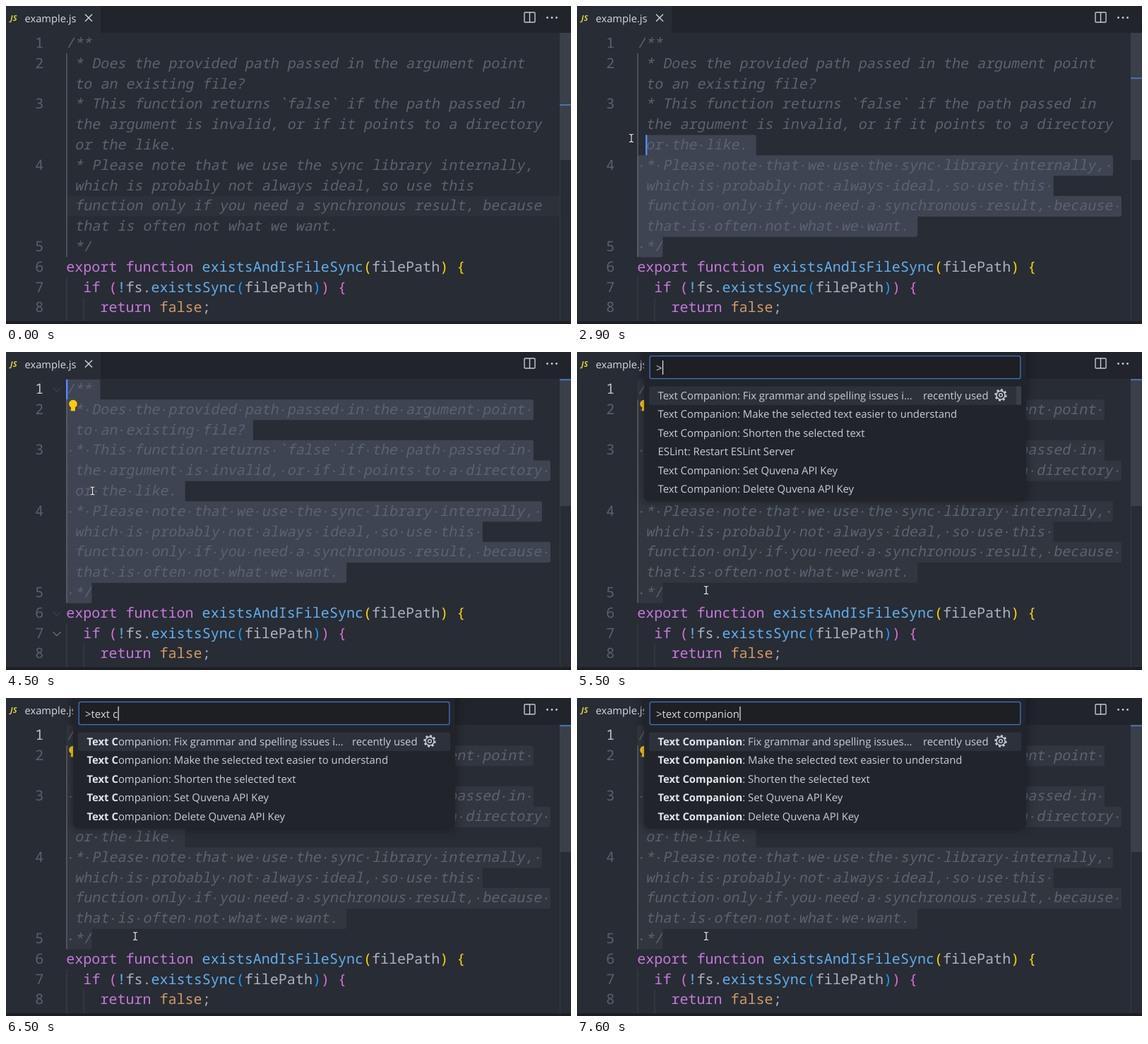
Recreate the animation shown at these times as an HTML page. Size 800 by 450 pixels, loop 8 s.

```html
<!DOCTYPE html>
<html lang="en">
<head>
<meta charset="utf-8">
<title>Editor command palette</title>
<style>
html, body { margin: 0; width: 100%; height: 100%; overflow: hidden; background: #282c34; }
svg { display: block; width: 800px; height: 450px; }
text { white-space: pre; text-rendering: geometricPrecision; }
.code { font: 20.05px "Noto Sans Mono", "DejaVu Sans Mono", monospace; }
.ui { font: 14.85px "Open Sans", "Noto Sans", sans-serif; fill: #c9cdd5; }
.hit { font-weight: 700; fill: #e1e4e9; }
</style>
</head>
<body>
<svg id="stage" viewBox="0 0 800 450" xmlns="http://www.w3.org/2000/svg"></svg>
<script>
const LOOP = 8000, STEP = 100;
const X0 = 85.3, CW = 12.03, TOP = 38.4, ROW = 28.8, LAST = 10, LAST_COL = 3;
const CLICK = 2500, RELEASE = 3800, BULB = 4200, OPEN = 5400, TYPE = 5800, KEY = 130;
const QUERY = "text companion";

const GREY = "#abb2bf", PURPLE = "#c678dd", BLUE = "#61afef",
      GOLD = "#ffd700", PINK = "#da70d6", AZURE = "#179fff";

// Comment rows: line number (0 when wrapped), first column, text
const comment = [
  [1, 0, "/**"],
  [2, 0, " * Does the provided path passed in the argument point"],
  [0, 1, "to an existing file?"],
  [3, 0, " * This function returns `false` if the path passed in"],
  [0, 1, "the argument is invalid, or if it points to a directory"],
  [0, 1, "or the like."],
  [4, 0, " * Please note that we use the sync library internally,"],
  [0, 1, "which is probably not always ideal, so use this"],
  [0, 1, "function only if you need a synchronous result, because"],
  [0, 1, "that is often not what we want."],
  [5, 0, " */"]
];
const code = [
  [6, 0, [["export function ", PURPLE], ["existsAndIsFileSync", BLUE], ["(", GOLD],
          ["filePath", GREY], [") {", GOLD]]],
  [7, 2, [["if ", PURPLE], ["(", PINK], ["!", BLUE], ["fs.", GREY], ["existsSync", BLUE],
          ["(", AZURE], ["filePath", GREY], [")", AZURE], [") {", PINK]]],
  [8, 4, [["return ", PURPLE], ["false", "#d19a66"], [";", GREY]]]
];
const commands = [
  ["Text Companion: Fix grammar and spelling issues i…", "Text Companion: Fix grammar and spelling issues…"],
  ["Text Companion: Make the selected text easier to understand"],
  ["Text Companion: Shorten the selected text"],
  ["ESLint: Restart ESLint Server"],
  ["Text Companion: Set Quvena API Key"],
  ["Text Companion: Delete Quvena API Key"]
];
// Pointer path: time, x, y
const path = [
  [1800, 92, 363], [2200, 119, 342], [2500, 124, 341], [2900, 77, 187],
  [3300, 58, 85], [3600, 62, 56], [4200, 62, 56], [4800, 183, 337]
];
const fades = [[1799, 0], [1800, 1], [2300, 0], [RELEASE, 0], [4200, 1], [4700, 0]];

const stage = document.getElementById("stage");
function el(tag, attrs, parent = stage, text) {
  const n = document.createElementNS("http://www.w3.org/2000/svg", tag);
  for (const k in attrs) n.setAttribute(k, attrs[k]);
  if (text !== undefined) n.textContent = text;
  parent.appendChild(n);
  return n;
}
const set = (n, attrs) => { for (const k in attrs) n.setAttribute(k, attrs[k]); };
const show = (n, on) => n.setAttribute("visibility", on ? "visible" : "hidden");
const box = (x, y, w, h, fill, parent, rx = 0) =>
  el("rect", { x, y, width: w, height: h, fill, rx }, parent);
const line = (d, stroke, width, parent) =>
  el("path", { d, stroke, "stroke-width": width, fill: "none" }, parent);
const colX = c => X0 + c * CW;
const rowY = r => TOP + r * ROW;
const clamp = (v, a, b) => Math.max(a, Math.min(b, v));
const colEnd = r => comment[r][1] + comment[r][2].length;

function track(keys, t) {
  if (t <= keys[0][0]) return keys[0].slice(1);
  for (let i = 1; i < keys.length; i++) {
    const a = keys[i - 1], b = keys[i];
    if (t <= b[0]) {
      const p = (t - a[0]) / (b[0] - a[0]);
      return a.slice(1).map((v, j) => v + (b[j + 1] - v) * p);
    }
  }
  return keys[keys.length - 1].slice(1);
}

// Editor
box(0, 0, 800, 450, "#282c34");
const rowLight = box(X0, rowY(8), 784 - X0, ROW, "#2c313a");
const selection = el("g", {});
const dots = el("g", { fill: "#5c6371" });
line(`M86 ${rowY(1)}V${rowY(11)}`, "#666b75", 1.2);
line(`M86 ${rowY(12)}V446M110 ${rowY(13)}V446`, "#3b4048", 1.2);

const numbers = [];
function lineNumber(n, row) {
  if (n) numbers[row] = el("text", { x: 41.2, y: rowY(row) + 20.6, class: "code" }, stage, n);
}
comment.forEach(([n, col, text], r) => {
  lineNumber(n, r);
  el("text", { class: "code", fill: "#5c6370",
    transform: `translate(${colX(col)} ${rowY(r) + 20.6}) skewX(-11)` }, stage, text);
});
code.forEach(([n, col, parts], i) => {
  const row = LAST + 1 + i;
  lineNumber(n, row);
  const t = el("text", { x: colX(col), y: rowY(row) + 20.6, class: "code" });
  for (const [s, fill] of parts) el("tspan", { fill }, t, s);
});
const chevrons = [[0, .28], [11, .28], [12, 1]].map(([r, max]) => {
  const y = rowY(r) + 12;
  return [line(`M66.5 ${y}l5.5 5.5l5.5 -5.5`, "#c5c8ce", 1.4), max];
});
const caret = box(0, 0, 2.4, ROW, "#528bff");

const bulb = el("g", {});
el("circle", { cx: 95, cy: 73.5, r: 5.8, fill: "#ffcc00" }, bulb);
box(92, 78, 6, 5.5, "#ffcc00", bulb, 1);

// Scroll bar
line("M784.5 38V446", "#343942", 1);
box(784, 38, 16, 180, "#3b3f49");
const marker = box(784, 0, 16, 2, "#4a72b5");

// Tab bar
box(0, 0, 800, 38, "#21252b");
box(0, 0, 134, 38.5, "#282c34");
el("text", { x: 6, y: 21, fill: "#d6cf3c",
  style: "font:italic 700 11px 'Open Sans','Noto Sans',sans-serif" }, stage, "JS");
el("text", { x: 26.5, y: 23, class: "ui", style: "font-size:14.7px;fill:#d7dae0" }, stage, "example.js");
line("M112 11.8l10 10m0 -10l-10 10", "#d0d3d9", 1.4);
el("rect", { x: 734, y: 9, width: 15, height: 14, rx: 1, fill: "none", stroke: "#c5c8ce", "stroke-width": 1.4 });
line("M741.5 9V23", "#c5c8ce", 1.4);
for (const cx of [766.5, 773, 779.5]) el("circle", { cx, cy: 16.5, r: 1.4, fill: "#c5c8ce" });
box(0, 446, 800, 4, "#1c1f24");

// Command palette
const palette = el("g", {});
const panel = box(95, -12, 541, 100, "#21252b", palette, 7);
panel.style.filter = "drop-shadow(0 0 7px rgba(0,0,0,.42))";
el("rect", { x: 103.2, y: 5.7, width: 524.6, height: 32, rx: 2.5, fill: "#1d1f23",
  stroke: "#4272c4", "stroke-width": 1.3 }, palette);
const input = el("text", { x: 112, y: 28, class: "ui", style: "font-size:15px;fill:#d7dae0" }, palette);
const inputCaret = box(0, 12, 1.3, 20, "#d7dae0", palette);
box(102, 48.5, 527, 26.5, "#2c313a", palette, 3);
const listBar = box(622, 48.5, 7, 26, "#3a3f4a", palette);
const items = commands.map(() => el("text", { x: 114.5, class: "ui" }, palette));
el("text", { x: 490, y: 67, class: "ui" }, palette, "recently used");
const gear = el("g", { fill: "none", stroke: "#d0d3d9" }, palette);
el("circle", { cx: 600, cy: 61, r: 6, "stroke-width": 1.4 }, gear);
el("circle", { cx: 600, cy: 61, r: 7.6, "stroke-width": 2.2, pathLength: 16, "stroke-dasharray": "1 1" }, gear);
el("circle", { cx: 600, cy: 61, r: 2.4, "stroke-width": 1.3 }, gear);

// Pointer
const pointer = el("g", {});
const beam = "M-3 -5.5Q0 -5.5 0 -4Q0 -5.5 3 -5.5M0 -4V4M-3 5.5Q0 5.5 0 4Q0 5.5 3 5.5";
line(beam, "#15171b", 2.6, pointer).setAttribute("opacity", .5);
line(beam, "#f0f0f0", 1.2, pointer);

function drawSelection(row, col, fill) {
  selection.replaceChildren();
  dots.replaceChildren();
  if (row === LAST && col === LAST_COL) return;
  const left = r => colX(r === row ? col : 0);
  const right = r => colX(r === LAST ? LAST_COL : colEnd(r) + 1);
  for (let r = row; r <= LAST; r++) {
    const [, start, text] = comment[r];
    const x = left(r), y = rowY(r);
    box(x, y, right(r) - x, ROW + .3, fill, selection, 3);
    if (r < LAST) {
      const sx = Math.max(x, left(r + 1));
      box(sx, y + ROW - 4, Math.max(0, Math.min(right(r), right(r + 1)) - sx), 8, fill, selection);
    }
    const wrapped = r < LAST && !comment[r + 1][0];
    [...text + (wrapped ? " " : "")].forEach((ch, i) => {
      const c = start + i;
      if (ch === " " && (r > row || c >= col))
        el("circle", { cx: colX(c + .5), cy: y + 15, r: 1.3 }, dots);
    });
  }
}

function drawItem(node, label, hit, i) {
  node.replaceChildren();
  node.setAttribute("y", 67 + 26.45 * i);
  const at = hit ? label.toLowerCase().indexOf(hit) : 0;
  el("tspan", {}, node, label.slice(0, at));
  el("tspan", { class: "hit" }, node, label.slice(at, at + hit.length));
  el("tspan", {}, node, label.slice(at + hit.length));
}

function drawPalette(t) {
  const count = t < TYPE ? 0 : clamp(Math.floor((t - TYPE) / KEY) + 1, 0, QUERY.length);
  const typed = QUERY.slice(0, count), hit = typed.trim();
  input.textContent = ">" + typed;
  inputCaret.setAttribute("x", 112.3 + input.getComputedTextLength());
  show(listBar, t >= OPEN && t < OPEN + 200);
  let shown = 0;
  commands.forEach((labels, i) => {
    const label = count > 9 && labels[1] || labels[0];
    const match = label.toLowerCase().includes(hit);
    items[i].style.display = match ? "" : "none";
    if (match) drawItem(items[i], label, typed, shown++);
  });
  panel.setAttribute("height", 64.5 + 26.45 * shown);
}

function draw(t) {
  const [mx, my] = track(path, t);
  show(pointer, t >= path[0][0]);
  pointer.setAttribute("transform", `translate(${mx} ${my})`);

  // The caret follows the pointer while dragging
  const active = t >= CLICK, open = t >= OPEN;
  let row = 8, col = 1;
  if (active) {
    const [dx, dy] = track(path, Math.min(t, RELEASE));
    row = clamp(Math.floor((dy - TOP) / ROW), 0, LAST);
    col = clamp(Math.round((dx - X0) / CW), comment[row][1], colEnd(row));
    drawSelection(row, col, open ? "#31363f" : "#3e4451");
  } else drawSelection(LAST, LAST_COL, "none");

  const empty = !active || (row === LAST && col === LAST_COL);
  show(rowLight, empty);
  rowLight.setAttribute("y", rowY(row));
  set(caret, { x: colX(col) - .3, y: rowY(row), opacity: t < 5000 ? 1 : t < 5100 ? .5 : 0 });
  show(caret, active && !open);
  marker.setAttribute("y", 38.2 + 12.6 * row);
  numbers.forEach((n, r) => n.setAttribute("fill", r === row ? "#bcc2cd" : "#596070"));

  const fade = track(fades, t)[0];
  for (const [n, max] of chevrons) n.setAttribute("opacity", max * fade);
  show(bulb, t >= BULB);
  palette.style.display = open ? "" : "none";
  if (open) drawPalette(t);
}

let last = -1;
function tick(now) {
  const t = Math.floor(now % LOOP / STEP) * STEP;
  if (t !== last) draw(last = t);
  requestAnimationFrame(tick);
}
draw(0);
requestAnimationFrame(tick);
</script>
</body>
</html>
```
